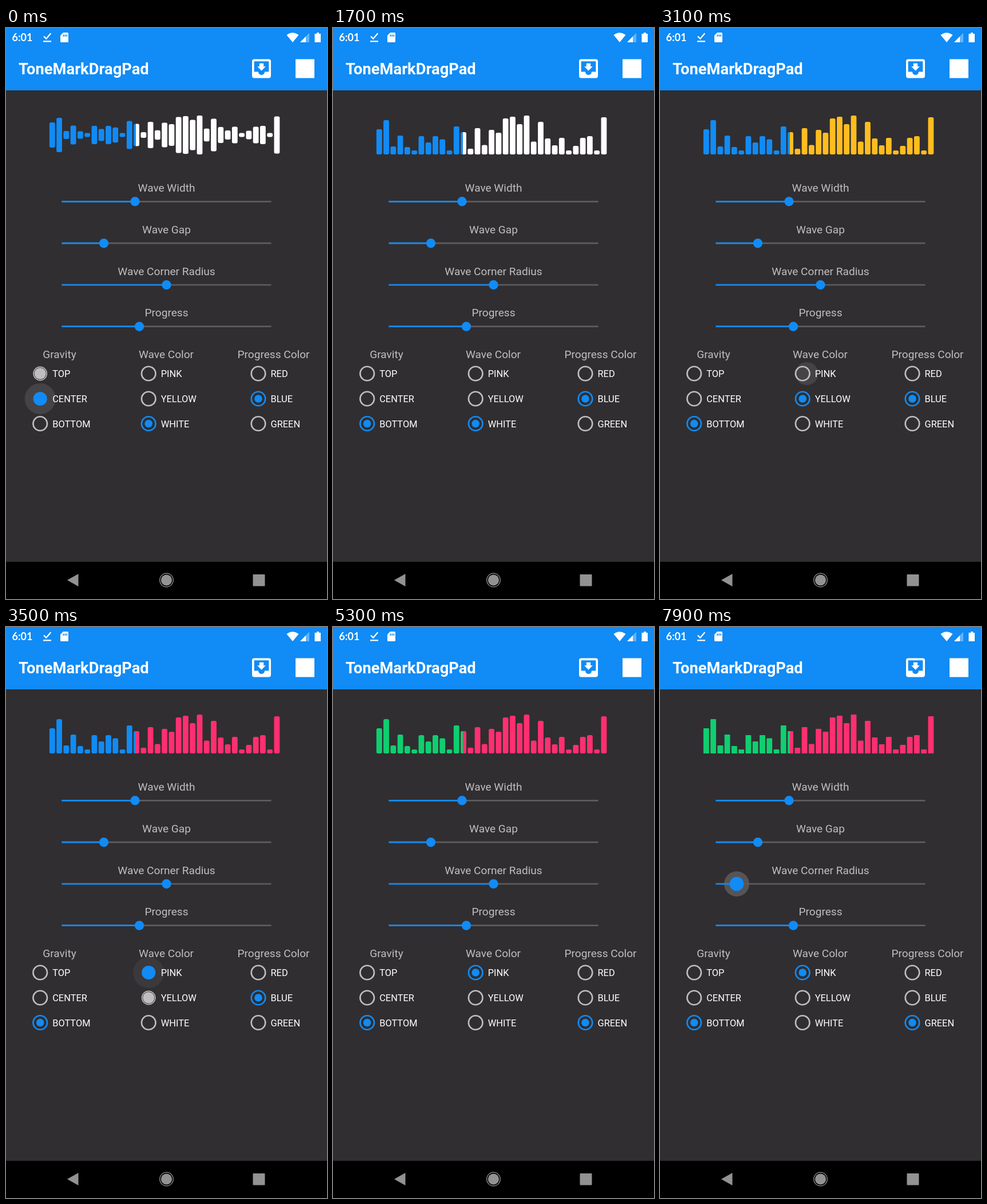
Animation, 561 px wide and 998 px high, one loop 8 s. Source, as an HTML page:

```html
<!DOCTYPE html>
<html lang="en">
<head>
<meta charset="utf-8">
<title>Wave settings</title>
<style>
html, body { margin: 0; width: 100%; height: 100%; overflow: hidden; background: #302e31; }
svg { display: block; width: 100%; height: 100%; font-family: Roboto, Arial, sans-serif; }
.label { font-size: 19.1px; fill: #bfbebf; text-anchor: middle; }
.option { font-size: 16.4px; fill: #fff; }
</style>
</head>
<body>
<svg id="stage" viewBox="0 0 561 998" preserveAspectRatio="none">
  <defs>
    <linearGradient id="wave" gradientUnits="userSpaceOnUse" x1="0" x2="561" y1="0" y2="0">
      <stop class="played" offset="0"/>
      <stop class="played" offset=".4055"/>
      <stop class="rest" offset=".4055"/>
      <stop class="rest" offset="1"/>
    </linearGradient>
  </defs>
  <rect width="561" height="998" fill="#302e31"/>
  <rect width="561" height="109" fill="#118bf5"/>
  <rect y="933" width="561" height="65"/>

  <g fill="#fff">
    <text x="10.5" y="23" font-size="18" font-weight="700" font-family="Lato, sans-serif">6:01</text>
    <path d="M66 14.5l4.3 4.3 8-9.5M65 23.4h14" fill="none" stroke="#fff" stroke-width="2.2"/>
    <path fill-rule="evenodd" d="M100 8h7.5q1.500 0 1.500 1.500v14q0 1.500-1.500 1.500h-11q-1.500 0-1.500-1.500v-10.500zM99.500 11.500v3.500h1.700v-3.500zM102.500 11.500v3.500h1.700v-3.500zM105.500 11.500v3.500h1.700v-3.500z"/>
    <path d="M490.500 12.200Q501 4.200 511.500 12.200L501 25z"/>
    <path d="M514 25L530 8.500V25z" opacity=".35"/>
    <path d="M514 25L524 14.700V25z"/>
    <path d="M543 8h4v2h3v15h-10.500v-15h3.500z"/>
    <text x="22" y="81" font-size="27.3" font-weight="700">ToneMarkDragPad</text>
    <path transform="translate(424.500 49) scale(1.835)" d="M19 3H5a2 2 0 0 0-2 2V19a2 2 0 0 0 2 2H19a2 2 0 0 0 2-2V5a2 2 0 0 0-2-2zm0 12h-4a3 3 0 0 1-6 0H5V5H19zm-3-5h-2V7h-4v3H8l4 4z"/>
    <rect x="506" y="54.500" width="33" height="33"/>
  </g>

  <g fill="#929292">
    <path d="M107 965L126.500 954V976z"/>
    <circle cx="280.500" cy="965" r="9.600"/>
    <circle cx="280.500" cy="965" r="11.800" fill="none" stroke="#929292" stroke-width="1.300"/>
    <rect x="431.500" y="955" width="21" height="20.500" rx="1"/>
  </g>
</svg>
<script>
const BLUE = '#118bf5', GREY = '#bfbebf';
const LOOP = 8000, STEP = 100;
const svg = document.getElementById('stage');

function add(tag, attrs, text) {
  const node = document.createElementNS('http://www.w3.org/2000/svg', tag);
  set(node, attrs);
  if (text) node.textContent = text;
  svg.appendChild(node);
  return node;
}
function set(node, attrs) {
  for (const key in attrs) node.setAttribute(key, attrs[key]);
}
const clamp = (v, lo = 0, hi = 1) => Math.min(hi, Math.max(lo, v));
const mix = (a, b, p) => a + (b - a) * p;

// Waveform
const heights = [44, 60, 14, 33, 13, 7, 32, 21, 32, 26.5, 7, 49, 39, 10, 46, 16.5, 43,
  38, 63, 66, 53, 68, 22.5, 57, 28, 16, 29, 7, 15, 29, 32, 7, 65];
const bars = heights.map((h, i) =>
  add('rect', { x: 75.9 + i * 12.27, width: 9.8, height: h, fill: 'url(#wave)' }));
const playedStops = svg.querySelectorAll('.played');
const restStops = svg.querySelectorAll('.rest');

function drawWave(t, radius) {
  const played = t < 4700 ? BLUE : '#0fcf70';
  const rest = t < 2100 ? '#ffffff' : t < 3200 ? '#ffbd1f' : '#ff2f70';
  playedStops.forEach(s => set(s, { 'stop-color': played }));
  restStops.forEach(s => set(s, { 'stop-color': rest }));
  bars.forEach((bar, i) => {
    const h = heights[i];
    const r = Math.min(radius, h / 2, 4.9);
    set(bar, { y: t < 1000 ? 187 - h / 2 : 221 - h, rx: r, ry: r });
  });
}

// Sliders
function slider(name, y, x) {
  add('text', { class: 'label', x: 280.5, y: y - 17.5 }, name);
  const halo = add('circle', { cy: y, r: 0, fill: '#fff', opacity: .18 });
  add('path', { d: `M97.5 ${y}H463.500`, stroke: '#5e5c5f', 'stroke-width': 2.7 });
  const line = add('path', { stroke: BLUE, 'stroke-width': 2.7 });
  const thumb = add('circle', { cy: y, fill: BLUE });
  const move = (cx, press) => {
    set(line, { d: `M97.500 ${y}H${cx}` });
    set(thumb, { cx, r: mix(8.2, 12.3, press) });
    set(halo, { cx, r: 22 * press });
  };
  move(x, 0);
  return move;
}
slider('Wave Width', 303.3, 225.5);
slider('Wave Gap', 376.2, 171);
const moveCorner = slider('Wave Corner Radius', 449, 280.5);
slider('Progress', 521.7, 233);

// Radio groups: each click selects a row; its ripple starts at press and is gone by end
const rows = [604, 648, 691.5];
const groups = [
  { name: 'Gravity', mid: 93.5, x: 59.7, options: ['TOP', 'CENTER', 'BOTTOM'], first: 0,
    clicks: [{ row: 1, press: -500, at: -300, end: 400 }, { row: 2, press: 900, at: 1000, end: 1700 }] },
  { name: 'Wave Color', mid: 280, x: 249.2, options: ['PINK', 'YELLOW', 'WHITE'], first: 2,
    clicks: [{ row: 1, press: 2000, at: 2100, end: 2600 }, { row: 0, press: 3000, at: 3200, end: 3700 }] },
  { name: 'Progress Color', mid: 467.5, x: 441, options: ['RED', 'BLUE', 'GREEN'], first: 1,
    clicks: [{ row: 2, press: 4600, at: 4700, end: 5200 }] }
];
groups.forEach(g => {
  add('text', { class: 'label', x: g.mid, y: 576.5 }, g.name);
  g.ripple = add('circle', { fill: '#fff' });
  g.radios = g.options.map((option, i) => {
    add('text', { class: 'option', x: g.x + 21.5, y: rows[i] + 6 }, option);
    return {
      ring: add('circle', { cx: g.x, cy: rows[i], fill: 'none' }),
      dot: add('circle', { cx: g.x, cy: rows[i] })
    };
  });
});

// Poses every 100 ms: outer radius, hole radius, dot radius
const turnOn = [[13.6, 10.9, 0], [13, 9, 0], [12.4, 5, 0], [12.1, 0, 0],
  [12.8, 10.2, 9], [13.4, 10.7, 7.5], [13.6, 10.9, 6.8]];
const turnOff = [[13.6, 10.9, 6.8], [13.2, 10.8, 7.8], [12.8, 10.7, 9], [12.4, 10.8, 10.1],
  [12.9, 2, 0], [13.4, 7.5, 0], [13.6, 10.9, 0]];

function drawRadio(radio, on, age) {
  const [outer, hole, dot] = (on ? turnOn : turnOff)[clamp(Math.floor(age / STEP), 0, 6)];
  const color = on ? BLUE : GREY;
  set(radio.ring, { r: (outer + hole) / 2, 'stroke-width': outer - hole, stroke: color });
  set(radio.dot, { r: dot, fill: color });
}

function drawGroup(g, t) {
  let now = g.first, before = -1, age = Infinity;
  set(g.ripple, { opacity: 0 });
  for (const c of g.clicks) {
    if (t >= c.at) {
      before = now;
      now = c.row;
      age = t - c.at;
    }
    if (t >= c.press && t < c.end) {
      const grow = clamp((t - c.press) / 135);
      set(g.ripple, {
        cx: g.x + 28 * (1 - grow), cy: rows[c.row], r: 27 * grow,
        opacity: .1 * clamp((c.end - t) / 400)
      });
    }
  }
  g.radios.forEach((radio, i) =>
    drawRadio(radio, i === now, i === now || i === before ? age : Infinity));
}

function draw(time) {
  const t = Math.floor((time % LOOP) / STEP) * STEP;
  const dragging = t >= 7300;
  const x = dragging ? mix(269, 134, (t - 7300) / 600) : 280.5;
  moveCorner(x, clamp((t - 7300) / 200));
  drawWave(t, dragging ? (x - 97.5) / 36.6 : 2.7);
  groups.forEach(g => drawGroup(g, t));
}

const start = performance.now();
function tick() {
  draw(performance.now() - start);
  requestAnimationFrame(tick);
}
tick();
</script>
</body>
</html>
```
